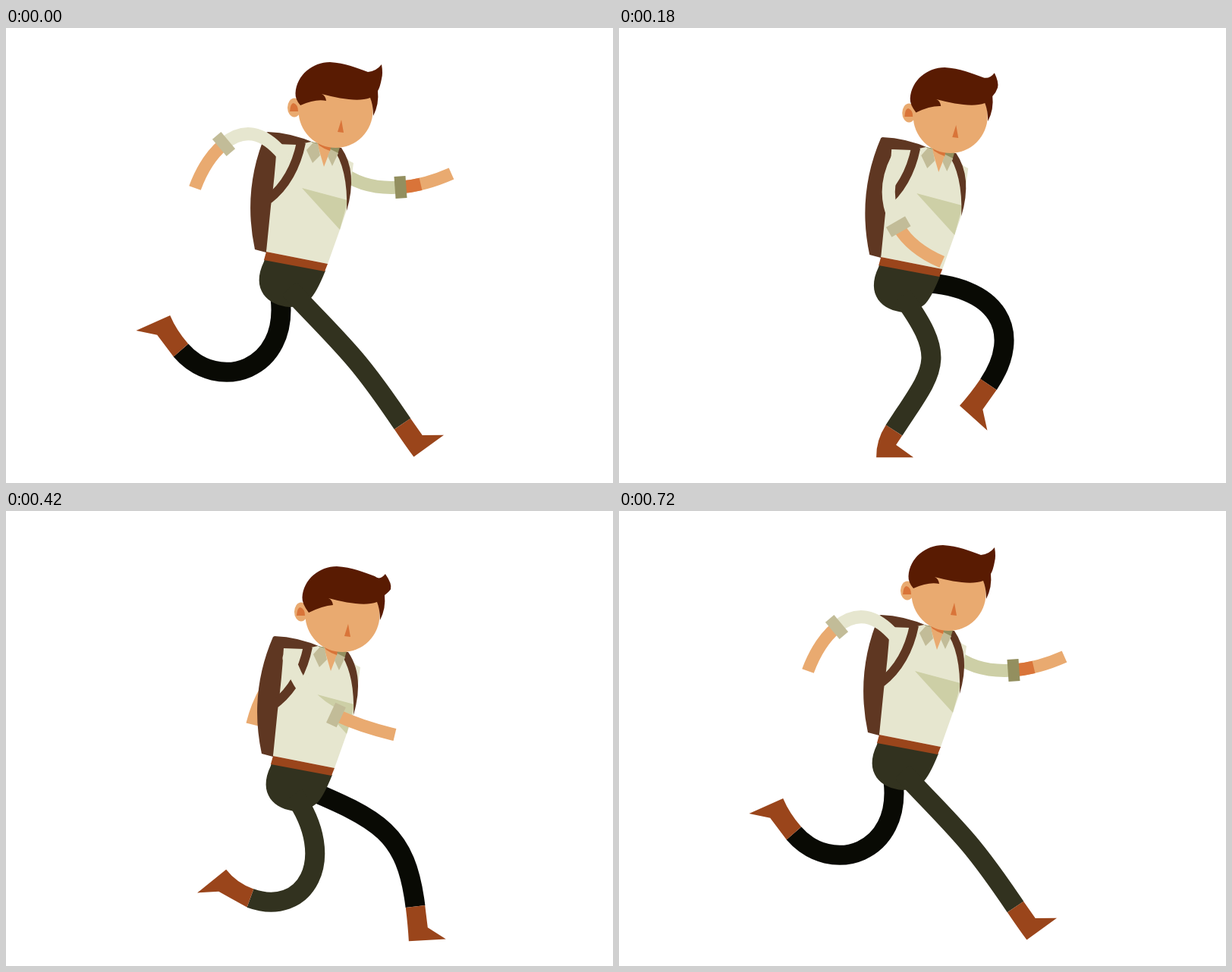
Animation of 800x600 px, one loop 750 ms. Source, as an HTML page:

```html
<!DOCTYPE html>
<html lang="en">
<head>
<meta charset="utf-8">
<title>Runner</title>
<style>
  html, body { margin: 0; width: 100%; height: 100%; overflow: hidden; background: #fff; }
  svg { display: block; width: 800px; height: 600px; }
  .line { fill: none; }
  .leg { stroke-width: 26; }
  .sleeve { stroke-width: 17; stroke-linecap: round; }
  .forearm { stroke: #e9aa70; stroke-width: 16.5; }
  .shade { stroke: #d97439; stroke-width: 16.5; stroke-dasharray: 27 999; }
  .strap { stroke: #5f3722; stroke-width: 12; }
  .boot, .belt { fill: #9a451b; }
  .pack { fill: #5f3722; }
  .shirt { fill: #e6e6cf; }
  .pants { fill: #32321f; }
  .skin { fill: #e9aa70; }
  .blush { fill: #d97439; }
  .collar { fill: #c2bc98; }
  .hair { fill: #591b02; }
</style>
</head>
<body>
<svg viewBox="0 0 800 600" xmlns="http://www.w3.org/2000/svg">
  <g class="bob" id="farArm">
    <path class="line sleeve" stroke="#cdcfa6"/>
    <path class="line forearm"/>
    <path class="line shade"/>
    <path class="cuff" fill="#938f5f"/>
  </g>
  <g id="farLeg"><path class="line leg" stroke="#090a04"/><path class="boot"/></g>
  <g class="bob">
    <path class="pack" d="M345 137Q376 138 408 152L360 220L343 296L328 292Q311 212 343 138Z"/>
    <path class="pants" d="M341 304L421 320Q409 350 400 358Q388 368 374 368C345 366 322 345 340 308Z"/>
  </g>
  <g id="nearLeg"><path class="line leg" stroke="#32321f"/><path class="boot"/></g>
  <g class="bob">
    <path class="shirt" d="M357 153L384 154L402 150L438 158L452 175L458 178L455 200L449 240L440 266L424 311L343 295L349 235Q354 200 357 153Z"/>
    <path class="belt" d="M343 295L424 311L420 321L340 306Z"/>
    <path fill="#cdcfa6" d="M390 211L450 227L448 237L440 266Z"/>
    <path class="line strap" d="M389 151Q379 200 346 226"/>
    <path class="pack" d="M430 157L442 158Q464 190 449 241Q451 185 430 157Z"/>
    <path fill="#938f5f" d="M402 150L440 157L437 167L426 163Z"/>
    <path class="skin" d="M410 152L419 183L428 160Z"/>
    <path class="blush" d="M411 152L413 155Q420 160 427 162L428 157Z"/>
    <path class="collar" d="M405 151L396 161L404 178L414 168L411 153ZM428 160L424 169L430 182L438 165Z"/>
  </g>
  <g class="bob" id="nearArm">
    <path class="line sleeve" stroke="#e6e6cf"/>
    <path class="line forearm"/>
    <path class="cuff" fill="#c2bc98"/>
  </g>
  <g class="bob">
    <ellipse class="skin" cx="380" cy="105" rx="9" ry="12.5"/>
    <path class="blush" d="M374 110Q375 99 379 99Q385 101 385 110Z"/>
    <circle class="skin" cx="434.5" cy="109" r="49"/>
    <path class="blush" d="M442 121L437 137L445 138Z"/>
    <path class="hair" id="hair"/>
  </g>
</svg>
<script>
  const STEP = 30, LOOP = 750, CYCLE = 720, STRIDE = CYCLE / 2;

  // Contact, down and passing pose of each side
  const KEYS = [0, 60, 180, 360, 420, 540];

  // ankle x, y, then the angles of thigh, shin and sole
  const LEG = [
    [522.5, 522, 47, 56, -36],
    [539.5, 521.5, 23, 83, -3.5],
    [362.5, 530.5, 54, 123, 0],
    [230.5, 425, 83, 229, 156],
    [322, 510.5, 55, 200, 141],
    [487, 470, 1, 124, 42]
  ];

  // cuff x, y, hand x, y, angle at the cuff
  const NEAR = { shoulder: [364, 166], poses: [
    [287, 153, 249, 211, 140],
    [285, 177, 264, 244, 130],
    [366, 255, 423.5, 301.5, 60],
    [447, 219, 529.5, 222, 10],
    [426, 241, 503.5, 267, 25],
    [301.5, 228, 304, 301.5, 108]
  ] };
  const FAR = { shoulder: [440, 188], poses: [
    [520, 210, 587, 192, -4],
    [506.5, 234.5, 576, 239, 14],
    [372, 228, 372, 298, 108],
    [355, 151, 299, 207, 168],
    [350, 187, 315.5, 253.5, 135],
    [456.5, 269, 515.5, 308.5, 52]
  ] };

  // Smooth periodic curve through the key poses
  function sample(poses, time) {
    const t = time % CYCLE, n = KEYS.length;
    let i = n - 1;
    while (KEYS[i] > t) i--;
    const near = [i - 1, i, i + 1, i + 2];
    const [t0, t1, t2, t3] = near.map(k => KEYS[(k + n) % n] + Math.floor(k / n) * CYCLE);
    const [A, B, C, D] = near.map(k => poses[(k + n) % n]);
    const h = t2 - t1, u = (t - t1) / h, u2 = u * u, u3 = u2 * u;
    return B.map((b, j) => {
      const m1 = (C[j] - A[j]) / (t2 - t0) * h, m2 = (D[j] - b) / (t3 - t1) * h;
      return b * (2 * u3 - 3 * u2 + 1) + m1 * (u3 - 2 * u2 + u)
           + C[j] * (3 * u2 - 2 * u3) + m2 * (u3 - u2);
    });
  }

  const $ = s => document.querySelector(s);
  const draw = (s, d) => $(s).setAttribute('d', d);
  const dir = deg => [Math.cos(deg * Math.PI / 180), Math.sin(deg * Math.PI / 180)];

  // Point at (along, across) from an origin facing [c, s]
  const frame = (x, y, [c, s]) => (u, v = 0) => [x + c * u - s * v, y + s * u + c * v];

  // Body sinks after each contact and rises before the next
  function bob(time) {
    const w = time / STRIDE * 2 * Math.PI;
    const y = 6.4 - 3.5 * Math.cos(w) + 25.3 * Math.sin(w) - 2.9 * Math.cos(2 * w);
    return [0.32 * y, y];
  }

  function drawLeg(id, time) {
    const [ax, ay, thigh, shin, sole] = sample(LEG, time);
    const [bx, by] = bob(time);

    // The hip slides along the pelvis as the thigh swings
    const hx = 388 - 0.32 * thigh + bx, hy = 328 + 0.33 * thigh + by;
    const knee = frame(hx, hy, dir(thigh))(95 + 18 * dir(thigh)[0]);
    const ankle = frame(ax, ay, dir(shin));
    const calf = ankle(-(115 - 0.27 * Math.abs(shin - thigh)));
    draw(id + ' .leg', `M${hx} ${hy}C${knee} ${calf} ${ax} ${ay}`);

    // The boot bends halfway between shin and sole, and stays above ground
    const [lx, ly] = ankle(0, 12.8);
    const [ex, ey] = frame(lx, ly, dir((shin + sole + 90) / 2))(44.5);
    const ground = 568.5 - 49 * Math.max(0, dir(sole)[1]);
    const foot = frame(ex, Math.min(ey, ground), dir(sole));
    draw(id + ' .boot', `M${lx} ${ly}L${ankle(0, -12.8)}L${foot(26, -16.5)}`
      + `L${foot(49)}L${foot(0)}Q${ankle(24, 12.8)} ${lx} ${ly}Z`);
  }

  function drawArm(id, arm, time) {
    const [cx, cy, ex, ey, angle] = sample(arm.poses, time);
    const cuff = frame(cx, cy, dir(angle));
    const reach = 0.45 * Math.hypot(ex - cx, ey - cy);
    const fore = `M${cx} ${cy}Q${cuff(reach)} ${ex} ${ey}`;
    draw(id + ' .sleeve', `M${arm.shoulder}Q${cuff(-50)} ${cx} ${cy}`);
    draw(id + ' .forearm', fore);
    if ($(id + ' .shade')) draw(id + ' .shade', fore);
    draw(id + ' .cuff', `M${cuff(-7.5, -14.5)}L${cuff(7.5, -14.5)}`
      + `L${cuff(7.5, 14.5)}L${cuff(-7.5, 14.5)}Z`);
  }

  // The quiff flops down as the body drops
  function drawHair(time) {
    const w = time / STRIDE * 2 * Math.PI;
    const f = 0.3 - 0.3 * Math.cos(w) + Math.sin(w);
    const tx = 495 - 4 * f, ty = 48 + 7 * f;
    const bx = 496 + 3 * f, by = 63 + 8 * f;
    const lx = 388 + 2 * f, ly = 102 + 4 * f;
    draw('#hair', `M${lx} ${ly}Q381 94 381.500 86C383 62 404 45 427 45C447 46 463 53 477 58`
      + `Q${tx - 7} ${ty + 9} ${tx} ${ty}Q${bx + 1} ${by - 3} ${bx - 1} ${by + 4}`
      + `Q${bx - 3} 78 490 83Q492 100 484 116Q484 102 480 92`
      + `C464 98 440 93 416 87Q421 89 422 96Q408 ${ly - 9} ${lx} ${ly}Z`);
  }

  const bobbing = document.querySelectorAll('.bob');
  function render(time) {
    for (const g of bobbing) g.setAttribute('transform', `translate(${bob(time)})`);
    drawLeg('#nearLeg', time);
    drawLeg('#farLeg', time + STRIDE);
    drawArm('#nearArm', NEAR, time);
    drawArm('#farArm', FAR, time);
    drawHair(time);
  }

  const start = performance.now();
  function tick() {
    const t = (performance.now() - start) % LOOP;
    render(Math.floor(t / STEP) * STEP % CYCLE);
    requestAnimationFrame(tick);
  }
  tick();
</script>
</body>
</html>
```
